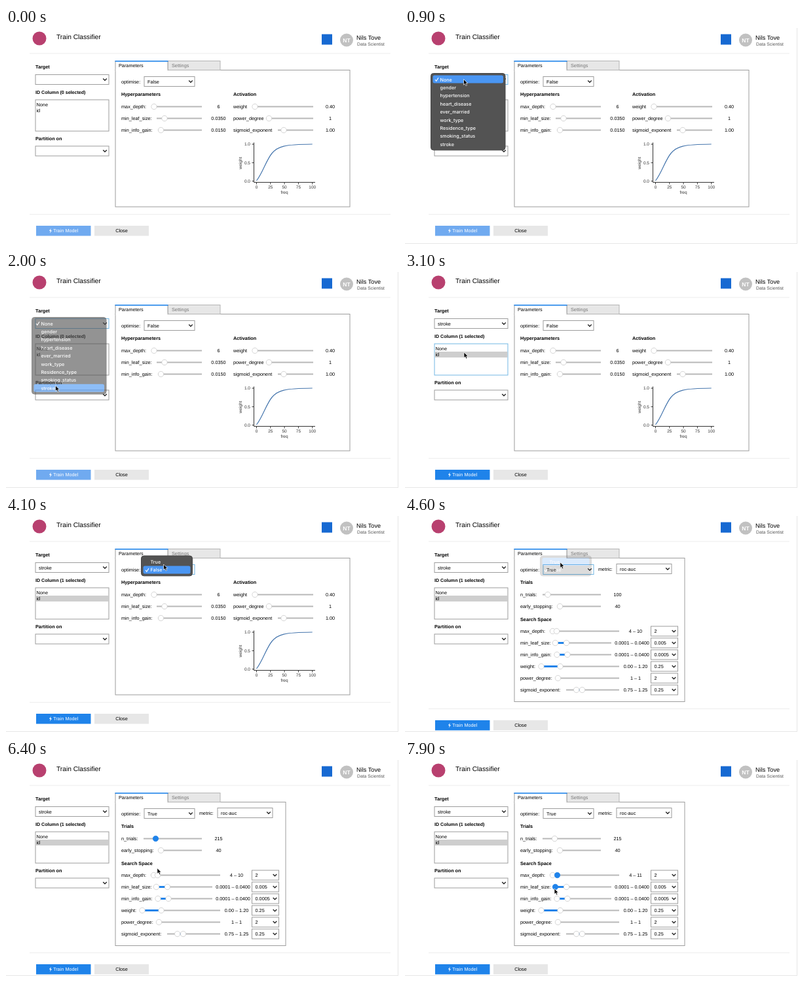
An HTML page for the animation above (8000 ms loop, 600 by 331 pixels).

```html
<!DOCTYPE html>
<html lang="en">
<head>
<meta charset="utf-8">
<title>Train Classifier</title>
<style>
  html, body { margin: 0; width: 100%; height: 100%; overflow: hidden; background: #fff; }
  svg { display: block; font: 7.3px "Liberation Sans", Arial, sans-serif; text-rendering: geometricPrecision; }
  text { white-space: pre; }
  .bold { font-weight: bold; }
  .menu { font: 500 7.2px Inter, sans-serif; fill: #fff; }
  .axis { font-size: 6.5px; fill: #333; }
  .mid { text-anchor: middle; }
  .end { text-anchor: end; }
</style>
</head>
<body>
<svg id="stage" width="600" height="331" viewBox="0 0 600 331"></svg>
<script>
const stage = document.getElementById('stage');
const LOOP = 8000;
const BLUE = '#1f83ea', PALE_BLUE = '#70aaf0', FOCUS = '#72b7e4', EDGE = '#9c9c9c';
const TARGETS = ['None', 'gender', 'hypertension', 'heart_disease', 'ever_married',
  'work_type', 'Residence_type', 'smoking_status', 'stroke'];

// Pointer tip: time, x, y
const POINTER = [
  [0, 130, 345], [700, 89.5, 78.5], [1000, 89.5, 78.5], [1750, 75.5, 174], [2100, 75.5, 174],
  [2600, 70, 131], [2950, 70, 131], [3100, 90, 123], [3750, 240.5, 74], [4150, 240.5, 74],
  [4300, 238, 67], [4500, 238, 67], [5100, 223, 119], [5300, 219, 119], [6000, 228, 119],
  [6550, 231.5, 176], [6800, 231.5, 176], [7000, 232.5, 176], [7150, 232.5, 176],
  [7550, 228.5, 204], [7850, 228, 197], [8000, 228, 197]
];

const clamp = v => Math.max(0, Math.min(1, v));
const during = (t, from, to) => t >= from && t < to;

function pointerAt(t) {
  const i = Math.max(1, POINTER.findIndex(k => k[0] > t));
  const [t0, x0, y0] = POINTER[i - 1], [t1, x1, y1] = POINTER[i];
  const p = clamp((t - t0) / (t1 - t0)), e = p * p * (3 - 2 * p);
  return [x0 + (x1 - x0) * e, y0 + (y1 - y0) * e];
}

const text = (x, y, s, cls = '', extra = '') =>
  `<text x="${x}" y="${y}" class="${cls}" ${extra}>${s}</text>`;
const rect = (x, y, w, h, fill, stroke = 'none', rx = 0) =>
  `<rect x="${x}" y="${y}" width="${w}" height="${h}" fill="${fill}" stroke="${stroke}" rx="${rx}"/>`;
const path = (d, stroke, width = 1, fill = 'none') =>
  `<path d="${d}" stroke="${stroke}" stroke-width="${width}" fill="${fill}"/>`;
const circle = (x, y, r, fill, stroke = 'none') =>
  `<circle cx="${x}" cy="${y}" r="${r}" fill="${fill}" stroke="${stroke}" stroke-width=".7"/>`;

function select(x, y, w, value, focused) {
  const cx = x + w - 6, cy = y + 7;
  return rect(x, y, w, 15, '#fff', focused ? FOCUS : EDGE) +
    text(x + 5, y + 10.2, value) +
    path(`M${cx - 2.8} ${cy - 1}l2.8 2.8 2.8 -2.8`, '#222', 1.3);
}

// A slider row; hot is the index of the pressed thumb
function slider(labelX, y, label, x0, x1, thumbs, valueX, value, hot = -1) {
  const [a, b] = thumbs;
  return text(labelX, y + 2.2, label) +
    rect(x0, y - 1, x1 - x0, 2, '#b8b8b8') +
    (b ? rect(a, y - 1.5, b - a, 3, BLUE) : '') +
    thumbs.map((x, i) => circle(x, y, 4.2, i === hot ? BLUE : '#fff', i === hot ? BLUE : '#c4c4c4')).join('') +
    text(valueX, y + 2.4, value, 'mid');
}

function menu(x, y, w, items, checked, active, opacity) {
  const step = 12.4;
  return `<g opacity="${opacity}">` +
    rect(x, y, w, items.length * step + 6, '#535353', '#454545', 4) +
    rect(x + 3, y + 3 + active * step, w - 6, 12, '#4a96f3', 'none', 2.5) +
    items.map((s, i) => text(x + 14, y + 12 + i * step, s, 'menu')).join('') +
    path(`M${x + 6.5} ${y + 9.5 + checked * step}l1.8 2.3 3.2 -5`, '#fff', 1.1) + '</g>';
}

function header() {
  return circle(51, 16, 10.5, '#b8406f') +
    text(77, 17.3, 'Train Classifier', '', 'font-size="10.2"') +
    rect(482, 9.5, 16, 16, '#1769d2') +
    circle(520, 18.5, 10, '#c1c1c1') +
    text(520, 21.5, 'NT', 'mid bold', 'font-size="8.5" fill="#fff"') +
    text(535, 18, 'Nils Tove', '', 'font-size="9.2"') +
    text(536, 27, 'Data Scientist', '', 'font-size="6.8" fill="#555"') +
    rect(36, 38.5, 551, 1, '#ededed');
}

function sidebar(t) {
  const chosen = t >= 2600;
  return text(45, 62, 'Target', 'bold') +
    select(45, 71.5, 112, t < 2200 ? '' : 'stroke', during(t, 700, 2600)) +
    text(45, 101, `ID Column (${t < 2800 ? 0 : 1} selected)`, 'bold', 'font-size="7.1"') +
    rect(45, 110, 112, 48, '#fff', during(t, 2600, 3700) ? FOCUS : EDGE) +
    (chosen ? rect(45.5, 122, 111, 9, '#cecece') : '') +
    text(46.5, 119.6, 'None') + text(46.5, 128.7, 'id') +
    text(45, 172, 'Partition on', 'bold') + select(45, 181, 112, '');
}

function panel(right, bottom) {
  return rect(167, 64.5, right - 167, bottom - 64.5, '#fff', EDGE) +
    rect(247, 50.5, 80, 14, '#e7e7e7', '#b4b4b4') +
    rect(167, 50.5, 80, 14, '#fff', EDGE) + rect(167.5, 63, 79, 3, '#fff') +
    rect(166.5, 50, 81, 1.6, BLUE) +
    text(172, 60, 'Parameters') + text(253, 60, 'Settings', '', 'fill="#777"');
}

function chart() {
  const ticks = [0, 1, 2, 3, 4].map(i => {
    const x = 382.5 + i * 21.3;
    return path(`M${x} 236.5v3`, '#333') + text(x, 246.3, i * 25, 'axis mid');
  }).join('') + [0, 1, 2].map(i => {
    const y = 234.7 - i * 28.3;
    return path(`M378.5 ${y}h-3`, '#333') + text(373, y + 2.2, (i / 2).toFixed(1), 'axis end');
  }).join('');
  return path('M378.5 175.5V236.5H472', '#333') + ticks +
    path('M382.5 234C392 222 397 203 406 192S425 178.5 467.7 178', '#4676ad', 1.2) +
    text(425, 254.3, 'freq', 'axis mid') +
    text(0, 0, 'weight', 'axis mid', 'transform="translate(360 207) rotate(-90)"');
}

function fixedForm(t) {
  return panel(525, 274) + text(176, 84.6, 'optimise:') +
    select(211, 74.5, 77, 'False', t >= 3700) +
    text(176, 104, 'Hyperparameters', 'bold') + text(347, 104, 'Activation', 'bold') +
    slider(176, 120.5, 'max_depth:', 222, 299, [226], 324.5, '6') +
    slider(176, 138.5, 'min_leaf_size:', 230, 299, [242], 324.5, '0.0350') +
    slider(176, 156.5, 'min_info_gain:', 232, 299, [236.5], 324.5, '0.0150') +
    slider(347, 120.5, 'weight', 376, 469, [380], 495, '0.40') +
    slider(347, 138.5, 'power_degree', 397, 469, [401.5], 495, '1') +
    slider(347, 156.5, 'sigmoid_exponent', 415, 469, [424], 495, '1.00') +
    chart();
}

function searchForm(t) {
  const drag = clamp((t - 5300) / 700), e = drag * drag * (3 - 2 * drag);
  const deeper = t >= 6950;
  const rows = [
    ['max_depth:', 221, 327, [225.5, deeper ? 232.5 : 231.5], 352, deeper ? '4 – 11' : '4 – 10', '2', t >= 6800 && t < 7950 ? 1 : -1],
    ['min_leaf_size:', 227, 315, [229.5, 246.5], 346.5, '0.0001 – 0.0400', '0.005', t >= 7750 ? 0 : -1],
    ['min_info_gain:', 229, 315, [232, 248], 346.5, '0.0001 – 0.0400', '0.0005'],
    ['weight:', 204, 327, [208, 237], 352, '0.00 – 1.20', '0.25'],
    ['power_degree:', 231, 327, [233.5], 352, '1 – 1', '2'],
    ['sigmoid_exponent:', 246, 327, [261.7, 270.5], 352, '0.75 – 1.25', '0.25']
  ];
  return panel(427, 284.5) + text(176, 84.6, 'optimise:') +
    select(211, 74.5, 77, 'True', t < 5200) +
    text(295, 83.5, 'metric:') + select(323, 73.5, 84, 'roc-auc') +
    text(176, 104, 'Trials', 'bold') +
    slider(176, 120.5, 'n_trials:', 210, 299, [218 + 10.5 * e], 324.5,
      100 + 5 * Math.round(23 * e), during(t, 5200, 6800) ? 0 : -1) +
    slider(176, 138.5, 'early_stopping:', 234, 299, [236.5], 324.5, '40') +
    text(176, 160.5, 'Search Space', 'bold') +
    rows.map(([label, x0, x1, thumbs, vx, value, step, hot], i) => {
      const y = 176.5 + 18 * i;
      return slider(176, y, label, x0, x1, thumbs, vx, value, hot) + select(375.5, y - 7.5, 41, step);
    }).join('');
}

function footer(t, y) {
  return rect(36, y, 551, 1, '#ededed') +
    rect(46, y + 18, 83.5, 15.5, t < 2250 ? PALE_BLUE : BLUE) +
    path(`M68.6 ${y + 22}l-2.6 4h1.8l-.8 3.4 3 -4.2h-1.9z`, 'none', 0, '#fff') +
    text(72, y + 28.3, 'Train Model', '', 'fill="#fff"') +
    rect(135, y + 18, 83, 15.5, '#e7e7e7') + text(176.5, y + 28.3, 'Close', 'mid');
}

function scene(t) {
  const [x, y] = pointerAt(t), searching = t >= 4600;
  const row = Math.max(0, Math.min(8, Math.round((y - 78) / 12.4)));
  return header() + sidebar(t) + (searching ? searchForm(t) : fixedForm(t)) +
    footer(t, searching ? 295 : 285) +
    (t >= 100 ? path('M598.5 0V330.5H0', '#e6e6e6') : '') +
    (during(t, 750, 2250) ? menu(39.5, 69.5, 113.5, TARGETS, 0, row, clamp(1 - (t - 1850) / 400)) : '') +
    (during(t, 3800, 4650) ? menu(206.5, 61, 78, ['True', 'False'], 1, y < 71 ? 0 : 1, clamp(1 - (t - 4400) / 250)) : '') +
    `<g transform="translate(${x} ${y})">` +
    path('M0 0V8.6L2 6.8 3.4 10 5 9.3 3.6 6.2H6.2Z', '#fff', .7, '#000') + '</g>';
}

function frame(now) {
  stage.innerHTML = scene(now % LOOP);
  requestAnimationFrame(frame);
}
requestAnimationFrame(frame);
</script>
</body>
</html>
```
